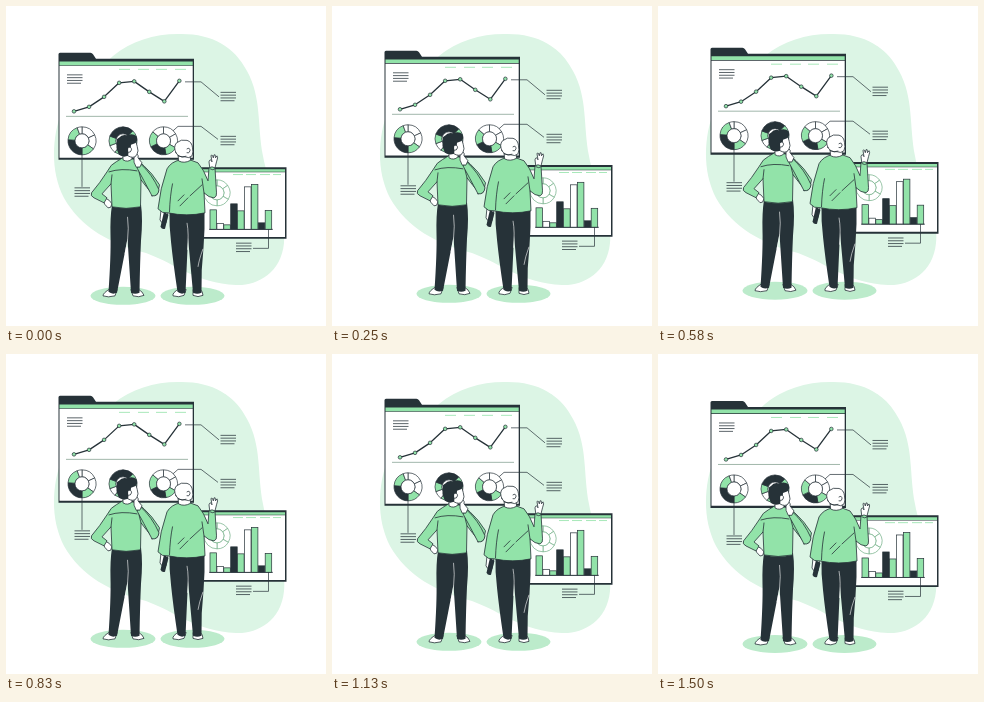
An HTML page that plays this animation: 320 px wide and 320 px high, repeating every 1540 ms.

```html
<!DOCTYPE html>
<html lang="en">
<head>
<meta charset="utf-8">
<title>Two people looking at charts</title>
<style>
  html, body { margin: 0; width: 100%; height: 100%; overflow: hidden; background: #fff; }
  svg { display: block; width: 100vw; height: 100vh; }
  .o { stroke: #263238; stroke-width: .8; stroke-linejoin: round; stroke-linecap: round; }
  .g { fill: #92e3a9; }
  .d { fill: #263238; }
  .w { fill: #fff; }
  .n { fill: none; }
  .soft { stroke: #92e3a9; stroke-width: .8; }
</style>
</head>
<body>
<svg viewBox="0 0 320 320" aria-hidden="true">
  <path fill="#dcf5e5" d="M172 28C205 27 228 40 241 65C256 92 251 120 257 150C262 180 281 205 278 237C275 268 250 280 230 279C190 277 170 258 140 247C105 238 75 222 58 192C44 165 46 130 56 105C68 80 85 70 107 50C125 35 148 28 172 28Z"/>
  <g id="scene">
    <g fill="#bcebcb">
      <ellipse cx="117" cy="290" rx="32.5" ry="9"/>
      <ellipse cx="186.500" cy="290" rx="32" ry="9"/>
    </g>

    <g id="board">
      <path class="d" d="M52.500 154V48.500Q52.500 47 54 47H84.500Q86 47 87 48.500L90 53H188V154Z"/>
      <path class="w" d="M53.500 60H186.700V151.800H53.500Z"/>
      <path class="g" d="M53.500 55.600H186.700V59.300H53.500Z"/>
      <path class="n soft" d="M113 63.500h11M132 63.500h11M150 63.500h11M169 63.500h11"/>
      <path class="n" stroke="#8aa596" stroke-width=".8" d="M60 110.500H182"/>
    </g>

    <g id="side">
      <path class="d" d="M190 161.300H280.500V233H190Z"/>
      <path class="w" d="M191 166.500H279V231.200H191Z"/>
      <path class="g" d="M191 163.300H279V166H191Z"/>
      <path class="n soft" d="M227 168.700h10M240 168.700h10M254 168.700h10M267 168.700h8"/>
    </g>

    <g id="charts"></g>

    <g id="left-man">
      <path class="o w" d="M104 283Q97 287 97 290Q102 292 109 290L111 284ZM125 284L127 290Q133 292 138 289.500Q137 286 132 283Z"/>
      <path class="d" d="M106 199H135Q137 213 135 235Q134 256 133.500 287Q129 289 125 287L121.500 233L111 287Q106 289 102.500 286Q105 250 104.500 230Q104 212 106 199Z"/>
      <path class="n" stroke="#fff" stroke-width=".6" d="M121.500 211Q123 222 121.500 235L119 248"/>
      <path class="o w" d="M99 192Q104 194 106 198Q105 203 102 202Q98 199 97 194Z"/>
      <path class="o g" d="M110 156Q105 158 101 166Q94 177 85.500 187Q84 190 88 192L98 197L101 192L96 188L105 178L106 201Q120 204 134.500 201L135 174Q141 182 147 189Q151 191 152 186L153.500 179Q146 167 138 160Q133 154 126 153L117 152Z"/>
      <path class="n o" d="M105 178L106 169M135 174L133 166M103 166Q115 162 131 165"/>
      <path class="o g" d="M146 190Q152 191 153 184Q146 168 134.500 158L131 162Q137 173 146 190Z"/>
      <path class="o w" d="M117 146L117 154Q122 157 126 153L126 149Z"/>
      <path class="o w" d="M121 138L130 136Q131.500 141 132 145L130.500 150Q127 153 122 150Z"/>
      <path class="d" d="M113 149Q109 141 111 136Q110 133 113 132Q116 128 121 129.500Q127 127 130.500 130.500Q132.500 135 129 137.500L125 139Q125 143 123 144L122 150Q117 152 113 149Z"/>
      <path class="o w" d="M122 142Q125.500 140 125.500 144Q125 147 122 146.500Z"/>
      <path class="o w" d="M130 161Q127 156 128 152L131 148.500Q133 149 132 152L136 157L134 161Z"/>
    </g>

    <g id="right-man">
      <path class="o w" d="M173 283Q166 287 167 290Q173 292 178 289.500L180 284ZM187 284L187 289.500Q192 292 197 289.500Q197 286 194 283Z"/>
      <path class="d" d="M163.500 205H198.500Q199 223 197.500 242Q195 264 195.500 287Q191 289 187 287L182 232L179.500 287Q175 289 171.500 286Q167 256 165 236Q163 220 163.500 205Z"/>
      <path class="n" stroke="#fff" stroke-width=".6" d="M181 217Q183 228 181.500 244M197 243Q193 254 192 261"/>
      <path class="o w" d="M155 204L154 214Q157 220 160 217L162 206Z"/>
      <path class="d" d="M158 206L162.500 209L159 223Q156 224 154.500 221Z"/>
      <path class="o w" d="M204 164L203 156Q204 152 206 156L205 150Q206 147.500 207.300 152L208 149Q209.500 147.500 209.500 152L211 150Q212.500 151 210.500 156L208.500 164Z"/>
      <path class="o g" d="M174 154Q165 156 161 163Q154 183 152 203Q156 208 162 207Q181 211 199 207L198 187Q203 192 208 192Q211 191 210.500 187L209 162Q206 160 203 162L202 175Q198 164 192 157L184 154Z"/>
      <path class="n o" d="M163.500 206Q164 190 166.500 178M198 187L196 173M174 200L182 192M184 190L196 179M172 195L178 189M204 163Q207 165 209 163"/>
      <path class="o w" d="M172 147L172.500 155Q178 158 184.500 154.500L184 148Z"/>
      <path class="o w" d="M170 147Q167 141 170.500 137Q175 133 181 134.500Q186 136 186.500 142Q187.500 146 186 150Q183 153 179 151Q173 152 170 147Z"/>
      <path class="n o" d="M181 143Q184 141 184 145Q183 148 181 147M172 150Q176 152 180 150.500"/>
    </g>
  </g>
</svg>
<script>
const LOOP = 1540, LIFT = 5.6, PEAK = 690;
const GREEN = '#92e3a9', DARK = '#263238', WHITE = '#fff';
const scene = document.getElementById('scene');
const charts = document.getElementById('charts');

function add(tag, attrs) {
  const el = document.createElementNS('http://www.w3.org/2000/svg', tag);
  for (const key in attrs) el.setAttribute(key, attrs[key]);
  charts.append(el);
}

const line = (d, width = 0.7, stroke = DARK) =>
  add('path', { d, fill: 'none', stroke, 'stroke-width': width, 'stroke-linejoin': 'round' });

function note(x, y) {
  for (let i = 0; i < 4; i++) line(`M${x} ${y + i * 2.8}h${i === 3 ? 14 : 15.5}`, 0.75);
}

// Each slice is [end angle, fill]; angles run clockwise from the top.
function donut(cx, cy, R, r, slices, stroke = DARK) {
  const at = (deg, rad) => {
    const a = (deg - 90) * Math.PI / 180;
    return `${cx + rad * Math.cos(a)} ${cy + rad * Math.sin(a)}`;
  };
  let from = 0;
  for (const [to, fill] of slices) {
    const big = to - from > 180 ? 1 : 0;
    add('path', {
      d: `M${at(from, R)}A${R} ${R} 0 ${big} 1 ${at(to, R)}L${at(to, r)}A${r} ${r} 0 ${big} 0 ${at(from, r)}Z`,
      fill, stroke, 'stroke-width': 0.7
    });
    from = to;
  }
  add('circle', { cx, cy, r, fill: WHITE, stroke, 'stroke-width': 0.7 });
}

// Line chart
const trend = [105.5, 101, 91, 77, 75.5, 86, 95.5, 75].map((y, i) => [68 + i * 15.05, y]);
line('M' + trend.join('L'), 1.3);
for (const [cx, cy] of trend) add('circle', { cx, cy, r: 1.8, fill: GREEN, stroke: DARK, 'stroke-width': 0.7 });

donut(76, 135, 14, 7, [[65, WHITE], [125, WHITE], [180, GREEN], [275, DARK], [340, GREEN], [360, WHITE]]);
donut(117, 135, 14, 7, [[45, DARK], [100, GREEN], [165, DARK], [215, GREEN], [250, WHITE], [290, GREEN], [360, DARK]]);
donut(157.5, 135, 14, 7, [[60, WHITE], [120, WHITE], [170, GREEN], [245, DARK], [310, GREEN], [360, WHITE]]);
donut(211, 187, 13, 7, [[55, WHITE], [120, WHITE], [180, WHITE], [270, WHITE], [360, WHITE]], '#6fae84');

// Callouts
line('M179 76H195L213 91');
line('M167 125L172 120.500H195L212 133.500');
line('M76 149V181');
line('M262.500 222V242.500H247');
note(61, 69);
note(214.5, 86.5);
note(214.5, 130.5);
note(68.5, 182);
note(230, 237.3);

// Bar chart: top edge and fill of each column
[[204, GREEN], [217.5, WHITE], [219, GREEN], [198, DARK], [205, GREEN],
 [181, WHITE], [178.5, GREEN], [217, DARK], [204.5, GREEN]].forEach(([y, fill], i) =>
  add('rect', { x: 204 + i * 6.9, y, width: 6.5, height: 223.5 - y, fill, stroke: DARK, 'stroke-width': 0.7 }));
line('M203 223.500H267');

function draw(now) {
  const phase = (now % LOOP - PEAK) / LOOP * 2 * Math.PI;
  const lift = LIFT * (1 + Math.cos(phase)) / 2;
  scene.setAttribute('transform', `translate(0 ${-lift.toFixed(3)})`);
}

const start = performance.now();
function tick() {
  draw(performance.now() - start);
  requestAnimationFrame(tick);
}
tick();
</script>
</body>
</html>
```
